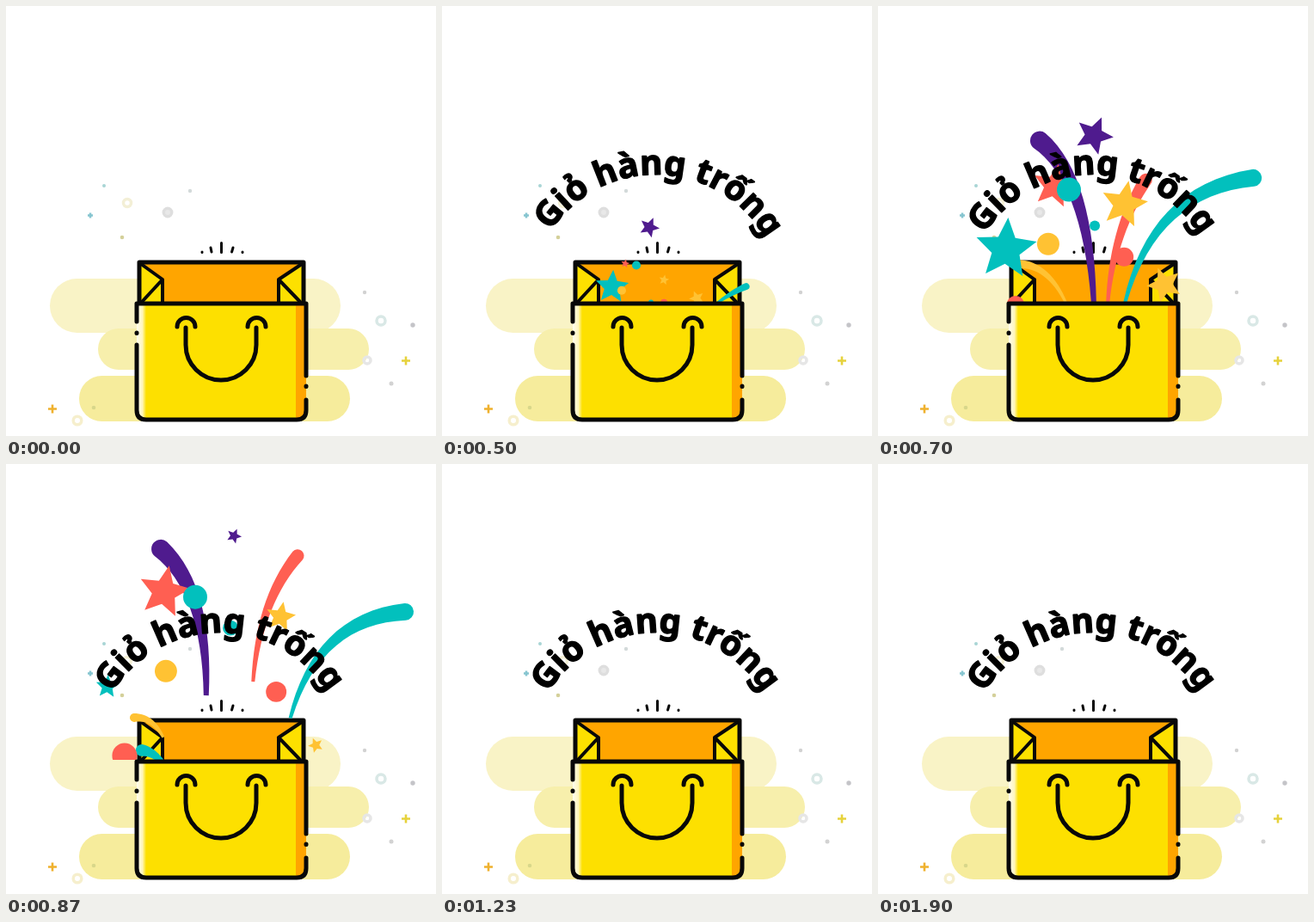
An HTML page that plays this animation: 500x500 px, repeating every 2.01 s.

```html
<!DOCTYPE html>
<html lang="vi">
<head>
<meta charset="utf-8">
<title>Giỏ hàng trống</title>
<style>
html, body { margin: 0; width: 100%; height: 100%; overflow: hidden; background: #fff; }
svg { display: block; width: 100vw; height: 100vh; }
.line { fill: none; stroke: #080808; stroke-width: 5; stroke-linecap: round; stroke-linejoin: round; }
.ring { fill: none; stroke-width: 3.5; }
text { font: 700 40px "Noto Sans", "Open Sans", sans-serif; stroke: #000; stroke-width: 1.5; stroke-linejoin: round; }
</style>
</head>
<body>
<svg viewBox="0 0 500 500">
  <defs>
    <path id="arc" d="M101.5 343a147 147 0 0 1 294 0"/>
    <clipPath id="mouth"><path d="M0 0H500V344H0z"/></clipPath>
    <linearGradient id="shine"><stop stop-color="#fffdf0"/><stop offset=".6" stop-color="#fff6bd"/><stop offset="1" stop-color="#fde000"/></linearGradient>
  </defs>

  <rect x="51" y="317" width="338" height="63" rx="31.5" fill="#f9f3c6"/>
  <rect x="107" y="375" width="315" height="48" rx="24" fill="#f7efac"/>
  <rect x="85" y="430" width="315" height="53" rx="26.5" fill="#f6ec9c"/>

  <g class="ring">
    <circle cx="141" cy="229" r="4.5" stroke="#f3efd6"/>
    <circle cx="188" cy="240" r="4.7" stroke="#dedede" fill="#e8e8e8"/>
    <circle cx="436" cy="366" r="5" stroke="#d9e8e6"/>
    <circle cx="420" cy="412" r="4" stroke="#e6e6e6"/>
    <circle cx="83" cy="482" r="4.8" stroke="#f6efcd"/>
  </g>
  <g id="dots"></g>
  <g fill="none" stroke-width="2.6">
    <path d="M95 243.500h6m-3-3v6" stroke="#86c5d0"/>
    <path d="M460 412.500h10m-5-5v10" stroke="#e6d23c"/>
    <path d="M49 468.500h10m-5-5v10" stroke="#efb12e"/>
  </g>
  <path class="line" style="stroke-width:3" d="M250.500 275.500v11M238 281l1 5M264 281l-1.500 5M228 286v.5M275 286v.5"/>

  <path d="M155 298H346V346H155z" fill="#ffa500"/>
  <path d="M157 299L182 318V346H155zM345 299L317 318V346H346z" fill="#fde000"/>
  <path class="line" style="stroke-width:4" d="M157 300L182 318V346M182 318L158 344M344 300L317 318V346M317 318L342 344"/>
  <path class="line" d="M155 346V298H346V346"/>

  <g id="confetti" clip-path="url(#mouth)"></g>

  <path d="M152 346H349V471q0 10-10 10H162q-10 0-10-10z" fill="#fde000"/>
  <path d="M152 346h11V481q-11 0-11-10z" fill="url(#shine)"/>
  <path d="M337 346h12V471q0 10-10 10h-2z" fill="#ffa500"/>
  <path class="line" d="M152 367V346H349V430M349 442v.5M349 458V470q0 11-11 11H163q-11 0-11-11V394M152 380v.5"/>
  <path class="line" d="M209 374v20a41 41 0 0 0 82 0v-20M199 373a10.500 10.500 0 0 1 21 0M281 373a10.500 10.500 0 0 1 21 0"/>

  <g id="title"><text text-anchor="middle"><textPath href="#arc" startOffset="50%">Giỏ hàng trống</textPath></text></g>
</svg>
<script>
const LOOP = 2010, KEYS = [500, 700, 870];
const PURPLE = '#4f1b8e', TEAL = '#02c0bd', CORAL = '#ff5f52', GOLD = '#ffc233';
const byId = id => document.getElementById(id);
const clamp = v => Math.max(0, Math.min(1, v));
const mix = (a, b, k) => a + (b - a) * k;

byId('dots').innerHTML = [
  [214, 215, 2.2, '#d3dada'], [114, 209, 2, '#a8d5d5'], [135, 269, 2.3, '#d4d09a'],
  [417, 333, 2.2, '#d2d2d2'], [473, 371, 2.7, '#c4c4c8'], [448, 439, 2.5, '#d2d2d2'],
  [102, 467, 2.3, '#d8d78a']
].map(([x, y, r, c]) => `<circle cx="${x}" cy="${y}" r="${r}" fill="${c}"/>`).join('');

// Each piece: colour, star angle (null = disc), then x, y and radius at KEYS
const pieces = [
  [PURPLE, 5, [241, 251, 265], [258, 151, 84], [12, 23, 9]],
  [CORAL, -79, [213, 205, 184], [300, 210, 149], [5, 26, 31]],
  [TEAL, -86, [198, 149, 118], [327, 283, 259], [20, 37, 14]],
  [GOLD, -79, [258, 286, 319], [319, 231, 178], [6, 28, 18]],
  [GOLD, -40, [296, 333, 360], [340, 324, 327], [9, 21, 9]],
  [TEAL, null, [226, 222, 220], [302, 214, 155], [5, 14, 14]],
  [TEAL, null, [243, 252, 261], [345, 256, 191], [3, 6, 9]],
  [GOLD, null, [209, 198, 186], [331, 277, 241], [5, 13, 13]],
  [CORAL, null, [258, 286, 314], [345, 292, 265], [4, 11, 12]],
  [CORAL, null, [185, 160, 138], [357, 347, 339], [5, 10, 14.5]]
];

// Each ribbon: colour, head and tail half-widths, then head, bend and tail points at KEYS
const ribbons = [
  [PURPLE, 11, 3, [[246, 352, 248, 420, 252, 500], [188, 157, 244, 201, 251, 345], [180, 99, 235, 147, 233, 270]]],
  [CORAL, 7.5, 2, [[259, 352, 258, 400, 257, 480], [311, 203, 273, 262, 267, 346], [339, 107, 294, 160, 287, 254]]],
  [TEAL, 10, 2, [[353, 327, 332, 336, 312, 352], [436, 200, 320, 215, 287, 345], [464, 172, 362, 180, 330, 296]]],
  [GOLD, 5, 1.5, [[215, 350, 225, 380, 235, 420], [163, 300, 198, 300, 219, 346], [149, 295, 170, 293, 183, 318]]],
  [TEAL, 7, 3, [[215, 370, 225, 380, 235, 395], [185, 353, 200, 356, 212, 370], [158, 333, 170, 334, 182, 347]]]
];

// Parabola through the three keyed values
function arcAt(v, t) {
  const [a, b, c] = KEYS;
  return v[0] * (t - b) * (t - c) / ((a - b) * (a - c))
    + v[1] * (t - a) * (t - c) / ((b - a) * (b - c))
    + v[2] * (t - a) * (t - b) / ((c - a) * (c - b));
}

function sizeAt(r, t) {
  if (t < 500) return r[0] * clamp((t - 430) / 70);
  if (t < 700) return mix(r[0], r[1], (t - 500) / 200);
  if (t < 870) return mix(r[1], r[2], (t - 700) / 170);
  return r[2] * clamp((1200 - t) / 330);
}

function piecePath([, angle, xs, ys, rs], t) {
  const r = sizeAt(rs, t);
  if (r < .3) return '';
  const x = arcAt(xs, t), y = arcAt(ys, t);
  if (angle === null) return `M${x - r} ${y}a${r} ${r} 0 0 1 ${2 * r} 0a${r} ${r} 0 0 1 ${-2 * r} 0z`;
  const points = [];
  for (let i = 0; i < 10; i++) {
    const a = (angle + i * 36) * Math.PI / 180, d = i % 2 ? r * .46 : r;
    points.push([x + d * Math.cos(a), y + d * Math.sin(a)]);
  }
  return `M${points.join('L')}z`;
}

function ribbonPath([, wide, thin, [a, b, c]], t) {
  if (t < 500 || t > 1050) return '';
  let p, scale = 1;
  if (t < 700) {
    const u = (t - 500) / 200, k = u * (1.4 - .4 * u);
    p = a.map((v, i) => mix(v, b[i], k));
    scale = mix(.4, 1, u);
  } else if (t < 870) {
    const u = (t - 700) / 170, k = u * (1.25 - .25 * u);
    p = b.map((v, i) => mix(v, c[i], k));
  } else {
    const k = (t - 870) / 180;
    p = c.map((v, i) => mix(v, c[i % 2], k * .7) + .6 * k * (c[i % 2] - b[i % 2]));
    scale = 1 - k;
  }
  const left = [], right = [];
  for (let i = 0; i <= 16; i++) {
    const u = i / 16, q = 1 - u;
    const at = j => q * q * p[j] + 2 * q * u * p[j + 2] + u * u * p[j + 4];
    const slope = j => q * (p[j + 2] - p[j]) + u * (p[j + 4] - p[j + 2]);
    const dx = slope(0), dy = slope(1), h = scale * mix(wide, thin, u) / (Math.hypot(dx, dy) || 1);
    left.push([at(0) - dy * h, at(1) + dx * h]);
    right.unshift([at(0) + dy * h, at(1) - dx * h]);
  }
  const r = wide * scale;
  return `M${left.join('L')}L${right.join('L')}A${r} ${r} 0 0 0 ${left[0]}z`;
}

const layers = [[ribbons, ribbonPath], [pieces, piecePath]].flatMap(([list, draw]) =>
  list.map(item => {
    const el = document.createElementNS('http://www.w3.org/2000/svg', 'path');
    el.setAttribute('fill', item[0]);
    byId('confetti').append(el);
    return t => el.setAttribute('d', draw(item, t));
  }));

const title = byId('title'), start = performance.now();
function frame() {
  const t = (performance.now() - start) % LOOP;
  const turn = 10.3 * clamp(1 - t / 900) ** 2;
  title.setAttribute('transform', `rotate(${turn} 248.5 343)`);
  title.setAttribute('opacity', clamp((t - 30) / 130));
  layers.forEach(draw => draw(t));
  requestAnimationFrame(frame);
}
frame();
</script>
</body>
</html>
```
